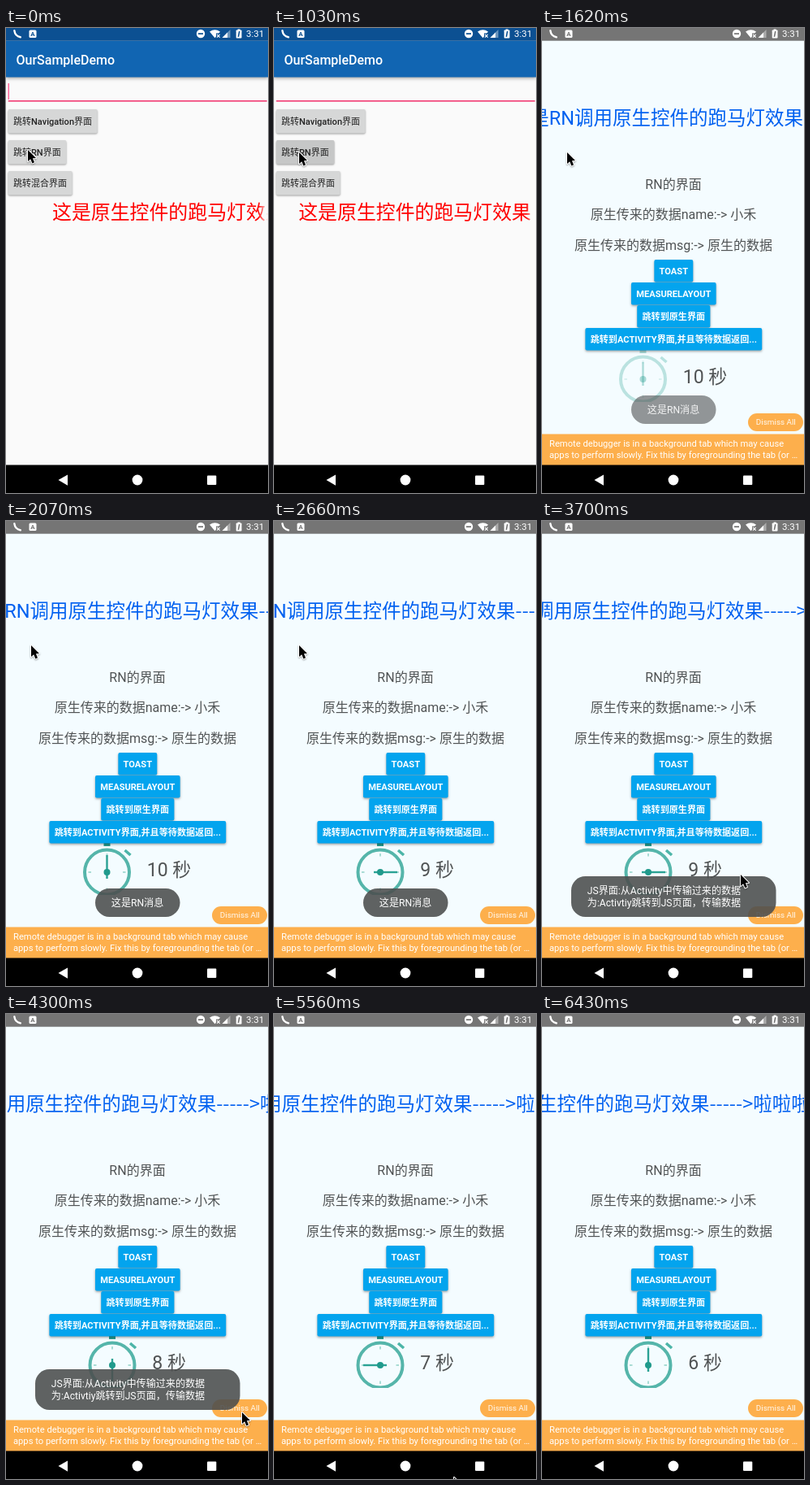
Animation, 323 px wide and 572 px high, one loop 6530 ms. Source, as an HTML page with a canvas:

```html
<!DOCTYPE html>
<html lang="zh-CN">
<head>
<meta charset="utf-8">
<style>
html, body { margin: 0; width: 100%; height: 100%; overflow: hidden; background: #fafafa; }
canvas { display: block; width: 323px; height: 572px; }
</style>
</head>
<body>
<canvas id="stage"></canvas>
<script>
const W = 323, H = 572, LOOP = 6530;
const PRESS = 1030, OPEN = 1470, STALL = 4900, RESUME = 5560;
const SANS = 'Roboto, "Noto Sans CJK SC", "Noto Sans CJK", sans-serif';
const CJK = '"Noto Sans CJK SC", "Noto Sans CJK", sans-serif';
const canvas = document.getElementById('stage');
const c = canvas.getContext('2d');
const dpr = window.devicePixelRatio || 1;
canvas.width = W * dpr;
canvas.height = H * dpr;

// The screen updates in bursts of even steps and rests in between.
const bursts = [
  { from: 0, to: 730, steps: 5 },
  { from: PRESS, to: PRESS, steps: 1 },
  { from: OPEN, to: STALL, steps: 23 },
  { from: RESUME, to: 6430, steps: 6 }
];

function hold(t) {
  const { from, to, steps } = bursts.filter(b => b.from <= t).pop();
  const step = (to - from) / steps || 1;
  return Math.min(to, from + Math.floor((t - from + 8) / step) * step);
}

// App time: almost stops during the stall, then catches up.
const appTime = t => t < RESUME ? t - OPEN : STALL - OPEN + 30 + 1.87 * (t - RESUME);

const clamp = v => Math.max(0, Math.min(1, v));
const fadeIn = (t, start, span = 225) => clamp((t - start) / span);
const fadeInOut = (t, start, end) => fadeIn(t, start) * (1 - fadeIn(t, end));

const pointerPath = [
  { t: 730, x: 27, y: 150 },
  { t: PRESS, x: 31, y: 153 },
  { t: 2960, x: 31, y: 153 },
  { t: 3260, x: 101, y: 263 },
  { t: 3850, x: 291, y: 490 },
  { t: 4450, x: 291, y: 490 },
  { t: STALL, x: 232, y: 366 },
  { t: RESUME, x: 222, y: 570 },
  { t: 5700, x: 222, y: 600 }
];

function pointerAt(t) {
  const i = pointerPath.findIndex(p => p.t >= t);
  if (i < 0) return pointerPath[pointerPath.length - 1];
  const b = pointerPath[i], a = pointerPath[i - 1] || b;
  const k = a === b ? 0 : (t - a.t) / (b.t - a.t);
  return { x: a.x + (b.x - a.x) * k, y: a.y + (b.y - a.y) * k };
}

function rect(x, y, w, h, fill) {
  c.fillStyle = fill;
  c.fillRect(x, y, w, h);
}

function round(x, y, w, h, r, fill) {
  c.beginPath();
  c.roundRect(x, y, w, h, r);
  c.fillStyle = fill;
  c.fill();
}

function disc(x, y, r, fill) {
  c.beginPath();
  c.arc(x, y, r, 0, Math.PI * 2);
  c.fillStyle = fill;
  c.fill();
}

function poly(points, fill) {
  c.beginPath();
  points.forEach(([x, y]) => c.lineTo(x, y));
  c.closePath();
  c.fillStyle = fill;
  c.fill();
}

function line(x1, y1, x2, y2, width, color) {
  c.beginPath();
  c.moveTo(x1, y1);
  c.lineTo(x2, y2);
  c.lineWidth = width;
  c.strokeStyle = color;
  c.stroke();
}

function text(str, x, y, size, color, { weight = 400, align = 'left', family = SANS } = {}) {
  c.font = `${weight} ${size}px ${family}`;
  c.textAlign = align;
  c.fillStyle = color;
  c.fillText(str, x, y);
}

function withShadow(blur, dy, draw) {
  c.save();
  c.shadowColor = 'rgba(0,0,0,.35)';
  c.shadowBlur = blur * dpr;
  c.shadowOffsetY = dy * dpr;
  draw();
  c.restore();
}

function statusBar(color) {
  rect(0, 0, W, 15.7, color);

  // handset
  c.beginPath();
  c.moveTo(10.3, 3.2);
  c.quadraticCurveTo(11.2, 10.2, 17.8, 11.2);
  c.lineWidth = 2.4;
  c.lineCap = 'round';
  c.strokeStyle = '#fff';
  c.stroke();
  c.lineCap = 'butt';

  round(28.5, 2.5, 9, 9.5, 1.5, '#fff');
  text('A', 33, 10.2, 8, color, { weight: 700, align: 'center' });

  disc(240, 7, 5.2, '#fff');
  rect(237, 6.2, 6, 1.7, color);

  // wifi without connection
  c.beginPath();
  c.moveTo(257.5, 12.3);
  c.lineTo(251, 4.5);
  c.quadraticCurveTo(257.5, -0.2, 264, 4.5);
  c.closePath();
  c.fillStyle = '#fff';
  c.fill();
  rect(259, 6.5, 6, 6, color);
  line(260, 7.8, 263.6, 11.6, 1.2, '#fff');
  line(263.6, 7.8, 260, 11.6, 1.2, '#fff');

  poly([[276.5, 2], [276.5, 12], [266.5, 12]], 'rgba(255,255,255,.4)');
  poly([[273, 5.5], [273, 12], [266.5, 12]], '#fff');

  round(283.7, 2.5, 6.8, 10, 0.8, '#fff');
  rect(285.6, 1.4, 3, 1.5, '#fff');
  line(287.8, 4, 286.4, 10.8, 1.6, color);

  text('3:31', 296, 11, 11.5, '#fff');
}

function navBar() {
  rect(0, 537.5, W, 35, '#000');
  poly([[64.5, 556], [76, 549.4], [76, 562.8]], '#fff');
  disc(162, 556, 6.4, '#fff');
  round(248, 550.5, 11.3, 11.5, 1, '#fff');
}

function nativeScreen(t) {
  rect(0, 0, W, H, '#fafafa');
  withShadow(4, 1.5, () => rect(0, 15.7, W, 44.8, '#1165b2'));
  statusBar('#0c5092');
  text('OurSampleDemo', 12.5, 44.5, 16, '#fff', { weight: 500 });

  if (t < 440) rect(2.6, 68, 1.2, 20, '#ff4081');
  rect(2.7, 89, 319, 1.6, '#f23a73');

  const labels = ['跳转Navigation界面', '跳转RN界面', '跳转混合界面'];
  labels.forEach((label, i) => {
    const y = 100 + 38 * i;
    const pressed = i === 1 && t >= PRESS;
    c.font = `500 11px ${SANS}`;
    const w = c.measureText(label).width + 13;
    withShadow(2, 1, () => round(2.7, y, w, 29.5, 2, pressed ? '#c6c7c7' : '#d6d7d7'));
    text(label, 9, y + 19, 11, '#222', { weight: 500 });
  });

  text('这是原生控件的跑马灯效果', 57 - 0.026 * t, 235, 23.9, '#f00');
  const edge = c.createLinearGradient(311, 0, W, 0);
  edge.addColorStop(0, 'rgba(250,250,250,0)');
  edge.addColorStop(1, 'rgba(250,250,250,1)');
  rect(311, 212, 12, 30, edge);
}

function stopwatch(x, y, quarter, alpha) {
  c.save();
  c.globalAlpha = alpha;
  c.translate(x, y);
  c.beginPath();
  c.rect(-30, -40, 62, 68);
  c.clip();
  rect(-4, -38, 8, 6, '#279c8e');
  line(22, -27, 29, -21, 3.5, '#4cb5a8');
  c.beginPath();
  c.arc(0, 0, 27.5, 0, Math.PI * 2);
  c.lineWidth = 4;
  c.strokeStyle = '#55b5aa';
  c.stroke();
  for (let i = 0; i < 4; i++) {
    c.rotate(Math.PI / 2);
    line(0, -23, 0, -19.5, 2, '#a9dcd5');
  }
  c.rotate(quarter * Math.PI / 2);
  line(0, 8, 0, -21, 2.4, '#2ba294');
  disc(0, 0, 4, '#209a8c');
  c.restore();
}

function toast(x, y, w, h, alpha, lines) {
  if (alpha <= 0) return;
  c.save();
  c.globalAlpha = alpha;
  round(x, y, w, h, 17.5, 'rgba(77,79,79,.89)');
  c.globalAlpha = alpha ** 0.3; // lettering stays bright while the pill fades
  lines.forEach((str, i) => text(str, x + 19.8, y + 22 + 14.8 * i, 12.1, '#fff'));
  c.restore();
}

function rnScreen(t) {
  const run = appTime(t);
  const center = { align: 'center' };
  rect(0, 0, W, H, '#f4fcff');
  statusBar('#757575');

  const lead = '这是RN调用原生控件的跑马灯效果';
  const x = -34.8 - 0.0234 * run;
  text(lead, x, 119, 23.5, '#0060f0');
  const tail = x + c.measureText(lead).width;
  text('----->啦啦啦啦', tail, 119, 23.5, '#0060f0', { family: CJK });

  ['RN的界面', '原生传来的数据name:-> 小禾', '原生传来的数据msg:-> 原生的数据']
    .forEach((str, i) => text(str, 162, 198 + Math.round(37.4 * i), 16, '#505354', center));

  const n = 10 - Math.floor(run / 1150);
  const shift = n > 9 ? -6.5 : 0;
  stopwatch(131 + shift, 432, 10 - n, fadeIn(t, 1420, 550));
  text(n + ' 秒', 180.3 + shift, 437, 23, '#505354');

  const labels = ['TOAST', 'MEASURELAYOUT', '跳转到原生界面', '跳转到ACTIVITY界面,并且等待数据返回...'];
  labels.forEach((label, i) => {
    const y = 285 + 28 * i;
    c.font = `700 11.1px ${SANS}`;
    const w = c.measureText(label).width + 12.5;
    withShadow(3, 1.5, () => round(162.3 - w / 2, y, w, 27.6, 2, '#03a4ee'));
    text(label, 162.3, y + 18, 11.1, '#fff', { weight: 700, align: 'center' });
  });

  round(254, 474, 68, 22, 11, '#fdaf4c');
  text('Dismiss All', 288.3, 488.4, 9.9, 'rgba(255,255,255,.92)', center);
  rect(0, 499.5, W, 39, '#fdaf4c');
  text('Remote debugger is in a background tab which may cause', 9, 515, 11.2, '#fff');
  text('apps to perform slowly. Fix this by foregrounding the tab (or …', 9, 529, 11.2, '#fff');

  toast(110, 452, 104.5, 35, fadeInOut(t, OPEN, 3140), ['这是RN消息']);
  toast(36, 437, 252.5, 50, fadeInOut(t, 3100, STALL + 10),
    ['JS界面:从Activity中传输过来的数据', '为:Activtiy跳转到JS页面，传输数据']);
}

function arrow({ x, y }) {
  c.save();
  c.translate(x, y);
  c.beginPath();
  [[0, 0], [0, 14], [3.2, 11.2], [5.4, 16.4], [8, 15.3], [5.9, 10.2], [10, 10]]
    .forEach(([px, py]) => c.lineTo(px, py));
  c.closePath();
  c.lineJoin = 'round';
  c.lineWidth = 2;
  c.strokeStyle = '#fff';
  withShadow(2, 1, () => c.stroke());
  c.fillStyle = '#000';
  c.fill();
  c.restore();
}

function frame() {
  const t = hold((performance.now() - start) % LOOP);
  c.setTransform(dpr, 0, 0, dpr, 0, 0);
  if (t < OPEN) nativeScreen(t);
  else rnScreen(t);
  navBar();
  arrow(pointerAt(t));
  requestAnimationFrame(frame);
}

const start = performance.now();
frame();
</script>
</body>
</html>
```
